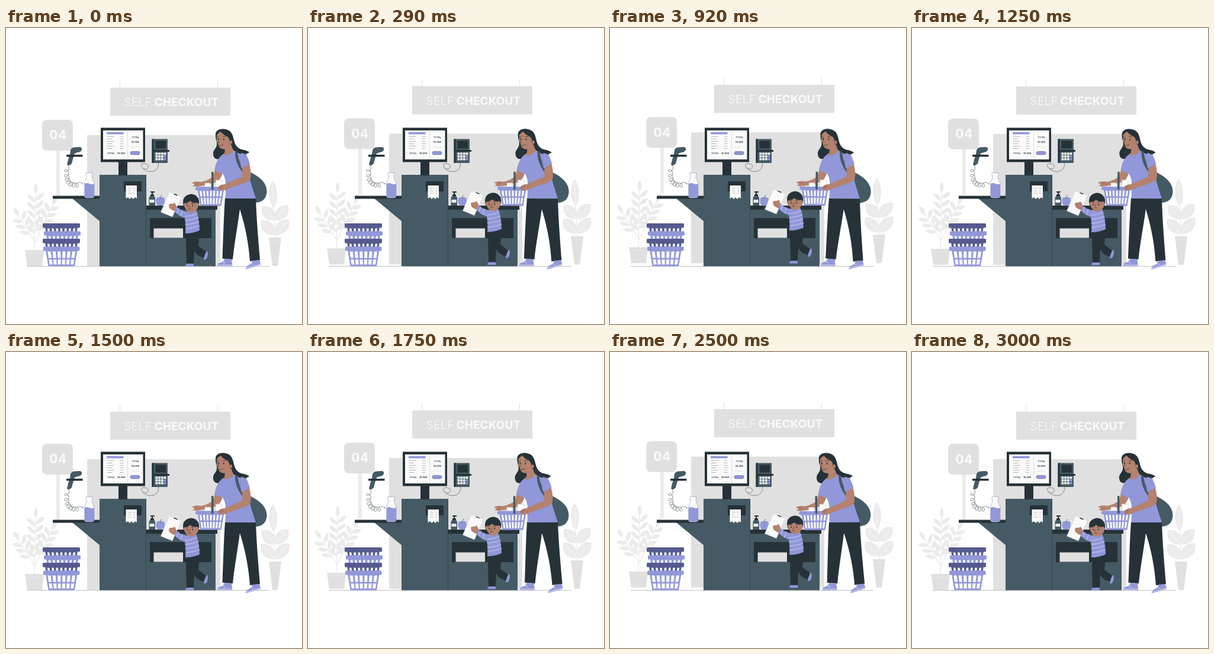
Write an HTML page that moves like this. It is 500 by 500 pixels and loops after 3040 ms.

```html
<!DOCTYPE html>
<html lang="en">
<head>
<meta charset="utf-8">
<title>Self checkout</title>
<style>
html, body { margin: 0; width: 100%; height: 100%; overflow: hidden; background: #fff; }
svg { display: block; width: 100vw; height: 100vh; }
text { font-family: Inter, "Open Sans", sans-serif; font-weight: 700; }
.d { fill: #263238; } .s { fill: #455a64; } .p { fill: #9197d8; } .q { fill: #555a8f; }
.k { fill: #b4826e; } .g { fill: #e0e0e0; } .l { fill: #ebebeb; } .w { fill: #fafafa; }
.o { fill: none; stroke: #263238; stroke-width: .7; stroke-linecap: round; }
</style>
</head>
<body>
<svg viewBox="0 0 500 500">
  <g id="back">
    <path class="g" d="M137 181H362V402H137z"/>
    <path stroke="#e0e0e0" d="M192.500 89V101M357.500 89V101"/>
    <path class="g" d="M176 100.700H379V148.200H176z"/>
    <g class="w" font-size="19">
      <text x="199.500" y="132" style="font-weight:300" letter-spacing=".5">SELF</text>
      <text x="250.500" y="132" letter-spacing=".1">CHECKOUT</text>
    </g>
    <path class="l" d="M85 206H91V284H85z"/>
    <rect class="g" x="61" y="155" width="52" height="52" rx="8"/>
    <text class="w" x="88" y="188.500" font-size="21" text-anchor="middle" letter-spacing=".5">04</text>
    <g id="fern" class="l"></g>
    <path class="g" d="M32 375H64L61 402H36z"/>
    <path class="o" style="stroke:#ebebeb" d="M34 380H63"/>
    <g id="shrub" class="l"></g>
    <path class="g" d="M444 354H465L459 402H450z"/>
    <path class="o" style="stroke:#ebebeb" d="M445 360H464"/>
  </g>

  <path stroke="#b4b4b4" stroke-width=".8" d="M35 402.500H445"/>

  <!-- counter -->
  <path class="s" d="M158 248H237V306H354V402.500H158zM112 288H159V327z"/>
  <path class="d" d="M79 283.500H158V288.500H79zM190 226H205V249H190zM199 259H229V276H199zM237 300H357V307H237zM243 321H347V355H243z"/>
  <path class="o" style="stroke-width:.5" d="M236.500 249V402"/>
  <path class="g" d="M249.500 338.500H299V354.500H249.500z"/>
  <path class="w" d="M202.500 266H221V288l-3-2-3 3-3-3-3 3-3-3-3.500 2z"/>
  <path class="o" style="stroke:#999;stroke-width:.6" d="M206 271h6m3 0h3M206 275h5m4 0h3M206 279h6m3 0h3"/>

  <!-- monitor -->
  <path class="d" d="M160 168.500H235V226.500H160z"/>
  <path class="w" d="M164 173H231.500V222H164z"/>
  <path class="p" d="M170 176H198.500V179.500H170z"/>
  <path class="o" style="stroke:#d8cfd2" d="M205.500 173V222M211 201H225"/>
  <path id="rows" class="o" style="stroke:#888;stroke-width:.6"/>
  <g class="d" font-size="4">
    <text x="171" y="212.800" style="font-weight:500">TOTAL</text><text x="188" y="212.800">10.05€</text>
    <text x="212.500" y="185.700" style="font-weight:500">TOTAL</text><text x="211.800" y="193.700">10.05€</text>
  </g>
  <rect class="p" x="210" y="208.500" width="16" height="5.500" rx="2.700" stroke="#555a8f" stroke-width=".6"/>

  <!-- card terminal -->
  <path class="o" style="stroke-width:.5" d="M257.500 228c1 8-4 15-14 14.500c-9-.5-15-7-15-11c1-4 12-3 12 2s-7 6-9 3"/>
  <rect class="s" x="246.500" y="187.500" width="26.500" height="40.500" rx="1"/>
  <path class="d" d="M246.500 187.500h3V228h-3zM252.500 190.500H270V203.500H252.500zM247 206H276V209H247z"/>
  <g id="keys"></g>

  <!-- scanner -->
  <path id="coil" class="o" style="stroke-width:.55"/>
  <path class="s" d="M109 206Q111 201.500 116 201.500L125 201Q129 202 128 206Q126 210 121 210L116 212Q113 220 111 229Q107 234 103 231Q105 221 108 213z"/>
  <path class="d" d="M102 214H129.500V217.500H102z"/>

  <!-- bottle, soap, apple -->
  <path d="M135 244.500H146V248.500L145 250Q145 255 149 261V283Q149 287 145 287H136Q132.500 287 132.500 283V261Q136.500 255 136 250L135 248.500z" fill="#fafafa" stroke="#8e93bd" stroke-width=".6"/>
  <path class="p" d="M133 263Q137 261 141 263T149 263V283Q149 286.500 145 286.500H136Q133 286.500 133 283z"/>
  <path class="s" d="M243.500 284H250Q252 285 252 288V300H241.500V288Q241.500 285 243.500 284z"/>
  <path class="d" d="M244 276H251V278H248V281H250V284H244V281H246V278H244z"/>
  <path class="l" d="M242.500 290H250.500V295H242.500z"/>
  <path class="p" d="M261 287C265 284 269 287 268 293C267 299 264 301 261 300C257 301 254 299 253.500 293C253 287 257 284 261 287z"/>
  <path class="o" d="M261 288Q260 284 263 282.500"/>

  <g id="stack"></g>

  <!-- woman -->
  <g id="woman">
    <path class="s" d="M405 240C424 248 441 259 440.500 277C439 293 428 296 412 295z"/>
    <path class="d" d="M354 181C353 172 364 168 373 172C383 176 382 191 387 199C393 208 402 203 411 210C403 213 405 220 396 222L364 219C358 224 350 221 350 213C349 207 355 204 356 198C357 192 354 190 354 181z"/>
    <path class="k" d="M353 240L366 244Q364 256 353 261L336 266L322 268L315 267L319 264L314 262Q319 258 330 260Q344 257 350 250z"/>
    <path d="M336 262H345V266L348 272H334L336 266zM354 257H365V261L368 272H352L355 261z" fill="#fafafa" stroke="#c8c8c8" stroke-width=".6"/>
    <g id="carry"></g>
    <path class="s" d="M347 243H350.500V273H347z"/>
    <path class="d" d="M370 287H422C423 320 426 356 429 392L412 394C410 366 405 337 395 306C392 330 386 362 383 391L365.500 389.500C367 352 368 315 370 287z"/>
    <path class="p" d="M369 390L381 391L382.500 402H357Q356 398 363 396Q368 394 369 390zM416 393L428 392L430.500 400L405 407.500Q404 403 411 400Q416 397 416 393z"/>
    <path class="o" style="stroke:#fff" d="M357 400.500H382M405 405.500L430 399M366 395l4 2M414 398l4 1"/>
    <path class="p" d="M361 218Q368 211 377 207L397 206Q407 210 411 228L402 234Q412 252 414 263L422 288H370.500L371 265Q371 253 366 246L352 241Q354 227 361 218z"/>
    <path class="k" d="M369 197L382 194Q382 203 385 207Q379 216 367 215Q371 209 369 203z"/>
    <path class="k" d="M356 181Q359 176 365 174Q376 179 380 188Q382 199 374 203Q366 207 361 202Q358 198 358 194L355 192Q357 187 356 181z"/>
    <path class="d" d="M362 174Q367 181 375 184Q378 188 378 195L381 198C382 206 388 210 397 213Q404 214 411 210C403 205 395 207 389 199C384 192 385 181 379 175Q371 168 362 174z"/>
    <ellipse class="k" cx="380" cy="193" rx="2" ry="3"/>
    <path class="o" d="M357 184l3-1.500M366 184q3-2 5 0M360 198q4 2 7-1M360 187l-2 5 2 1"/>
    <path class="d" d="M358 186h1.500v2.500h-1.500zM367 187h1.700v2.500h-1.700z"/>
    <path class="s" d="M387 207Q386 226 398 242L411 252L407 242Q393 231 391 209z"/>
    <path class="k" d="M399 235L411 229Q415 244 413 254Q411 259 402 262L376 271Q368 276 360 274L358 270Q361 264 369 264L399 251z"/>
    <path class="p" d="M397 211Q406 211 412 229L398 237Q394 226 397 211z"/>
    <path class="o" style="stroke:#7379bb" d="M398 237Q395 230 395 222"/>
    <path class="o" style="stroke:#8e5d4c" d="M359 269l6-2M360 271l6-2M320 264l5-1"/>
  </g>

  <!-- child -->
  <g id="child">
    <path class="w" d="M276 277L296.500 285L281 319L261.500 311z" stroke="#d2d2d2" stroke-width=".6"/>
    <path class="o" style="stroke-width:1.400" d="M284 280.500l5 2"/>
    <path class="p" d="M335 379L340 377Q342 381 340 387Q338 392 334 391Q336 385 333 384zM306 396H317V402.500H303Q303 399 306 398z"/>
    <path class="d" d="M304 345L326 344Q327 356 325 368L338 378L334 388Q322 385 318 376L317 398H305Q304 372 304 345z"/>
    <path class="k" d="M275 299Q276 296 281 297L285 295L289 303L287 310Q280 308 276 304z"/>
    <path class="p" d="M288 302Q295 308 304 310L321 308Q326 318 327 342Q316 347 303 347Q304 333 302 321Q292 318 285 310z"/>
    <path class="o" style="stroke:#e1e3fa" d="M303 318Q315 318 323 313M303 325Q316 324 325 320M303 332Q317 331 326 327M304 339Q317 338 327 334M292 304l-3 8M298 308l-3 9"/>
    <path class="k" d="M306 305H319V310Q313 314 306 310z"/>
    <path class="d" d="M300 301Q296 286 308 281.500Q318 278 325 288Q328 296 324 303Q314 310 302 304z"/>
    <path class="k" d="M301 296Q307 296 311 292Q316 297 323 295Q326 296 325 300Q324 308 316 310Q305 312 302 303Q299 299 301 296z"/>
    <path class="d" d="M305.500 299h1.500v2.200h-1.500zM314.500 299h1.500v2.200h-1.500z"/>
    <path class="o" d="M304 297l3-.7M313 296.500l3.500.3M308 306q2-1.500 4 0M310.500 300l-1.500 3"/>
  </g>
</svg>
<script>
const $ = id => document.getElementById(id);
const path = (d, cls = "") => `<path class="${cls}" d="${d}"/>`;

// A pointed leaf growing from its base, with an optional pale vein
const leaf = (x, y, angle, len, wide, vein = "") =>
  `<g transform="translate(${x} ${y}) rotate(${angle})">` +
  path(`M0 0C${-wide} ${-len * .3} ${-wide} ${-len * .75} 0 ${-len}C${wide} ${-len * .75} ${wide} ${-len * .3} 0 0`) +
  (vein && `<path d="M0 0V${-len * .85}" stroke="${vein}" stroke-width=".6"/>`) + "</g>";

// A thin stem with paired leaves and one at the tip
function branch(x0, y0, x1, y1, pairs, len) {
  const lean = Math.atan2(x1 - x0, y0 - y1) * 180 / Math.PI;
  let out = `<path d="M${x0} ${y0}L${x1} ${y1}" stroke="#e4e4e4"/>` + leaf(x1, y1, lean, len, 4.500);
  for (let i = 0; i < pairs; i++) {
    const u = .3 + .7 * i / pairs, x = x0 + u * (x1 - x0), y = y0 + u * (y1 - y0);
    out += leaf(x, y, lean - 48, len, 4.500) + leaf(x, y - 3, lean + 48, len, 4.500);
  }
  return out;
}
$("fern").innerHTML = branch(48, 375, 50, 281, 5, 19) + branch(49, 362, 78, 300, 4, 18) + branch(48, 360, 22, 318, 3, 18);

let shrub = `<path d="M455 355L451 280" stroke="#e4e4e4"/>` + leaf(452, 305, -2, 48, 9, "#fff");
for (const [y, len] of [[325, 32], [350, 34]])
  shrub += leaf(454, y, -42, len, 13, "#fff") + leaf(454, y, 42, len + 2, 13, "#fff");
$("shrub").innerHTML = shrub;

let rows = "";
for (let y = 183.500; y < 204; y += 4) rows += `M171 ${y}h${y % 8 > 4 ? 11 : 8}M193 ${y}h5`;
$("rows").setAttribute("d", rows);

let keys = "";
for (let i = 0; i < 12; i++)
  keys += path(`M${252.500 + i % 4 * 4.700} ${210.500 + (i >> 2) * 4.600}h3.800v3.700h-3.800z`, i % 4 == 3 && i > 4 ? "p" : "w");
$("keys").innerHTML = keys;

// Coiled scanner cord: small loops along a bend
let coil = "M105 232";
for (let i = 0; i <= 140; i++) {
  const u = i / 140, v = 1 - u, a = u * 44;
  const x = v * v * 103 + 2 * u * v * 98 + u * u * 126;
  const y = v * v * 236 + 2 * u * v * 272 + u * u * 264;
  coil += `L${(x + 3.700 * Math.cos(a)).toFixed(1)} ${(y + 3.700 * Math.sin(a)).toFixed(1)}`;
}
$("coil").setAttribute("d", coil + "L130 262");

// Tapered crate with slits and a rim; gap is the slit share of each bar's pitch
function basket(x, y, w, h, rim, cls, n, split, gap) {
  const inset = h * .17;
  let out = path(`M${x + 3} ${y}H${x + w - 3}L${x + w - 3 - inset} ${y + h}H${x + 3 + inset}z`, cls);
  const slit = (from, to) => {
    for (let i = 0; i < n; i++) {
      const k = (i + .5) / n - .5, half = w / n * gap / 2;
      const at = yy => x + w / 2 + k * (w - 9 - 2 * inset * (yy - y) / h);
      out += path(`M${at(from) - half} ${from}h${half * 2}L${at(to) + half} ${to}h${-half * 2}z`, "w");
    }
  };
  slit(y + rim + 1, y + split - 1);
  if (split < h - 4) slit(y + split + 1.500, y + h - 3);
  return out + `<rect class="${cls}" x="${x}" y="${y}" width="${w}" height="${rim}" rx="1.500"/>`;
}
$("stack").innerHTML =
  basket(62, 330, 63, 15, 7.500, "q", 7, 15, .4) + basket(64, 343.500, 62, 14, 7, "p", 7, 14, .4) +
  basket(62, 356, 63, 15, 7.500, "q", 7, 15, .4) + basket(63, 369.500, 61.500, 33, 7, "p", 6, 20, .5);
$("carry").innerHTML = basket(320, 268.500, 52, 32, 5.500, "p", 7, 17, .4);

function draw(now) {
  const t = Math.min(now % 3040, 3000), p = t % 1500 / 750, s = t / 750;
  const lift = -6.200 * (p < 1 ? p : 2 - p);
  const sway = s < 1 ? s : s < 3 ? 2 - s : s - 4;
  for (const id of ["back", "child"]) $(id).setAttribute("transform", `translate(0 ${lift})`);
  $("woman").setAttribute("transform", `rotate(${sway} 378 289)`);
  requestAnimationFrame(draw);
}
draw(performance.now());
</script>
</body>
</html>
```
